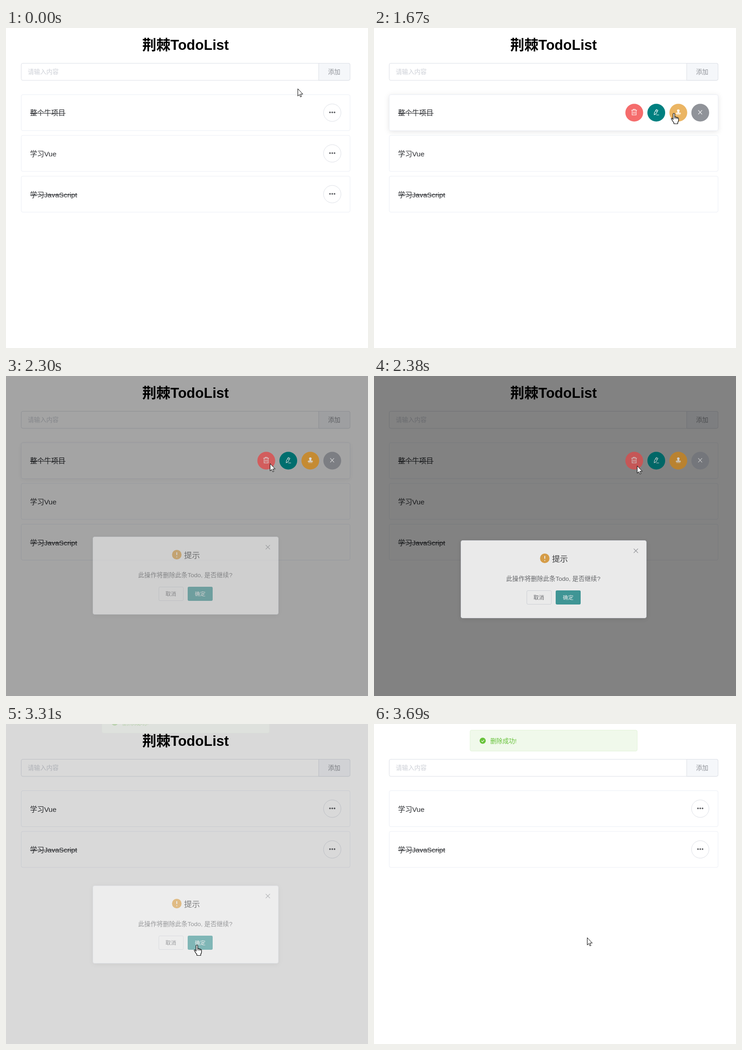
An HTML page that plays this animation: 797 by 703 pixels, repeating every 4500 ms.

```html
<!DOCTYPE html>
<html lang="zh">
<head>
<meta charset="utf-8">
<title>TodoList</title>
<style>
  html, body { margin: 0; width: 100%; height: 100%; overflow: hidden; background: #fff; }
  svg { display: block; width: 797px; height: 703px;
    font-family: "Liberation Sans", "Noto Sans CJK SC", "Noto Sans CJK", sans-serif; }
  h1, .title { font-size: 31px; font-weight: bold; }
  .item { font-size: 15.52px; fill: #2a2c30; }
  .body { font-size: 13.58px; }
  .small { font-size: 11.64px; text-anchor: middle; }
  .card { fill: #fff; stroke: #ebeef5; }
  .strike { stroke: #2a2c30; }
  .shadow { fill: rgba(0, 0, 0, .1); filter: blur(6px); }
  .line { fill: none; stroke: #fff; stroke-width: 1.1; }
  .ring { fill: #fff; stroke: #dcdfe6; }
  .dots { fill: #606266; }
  .pointer { fill: #fff; stroke: #000; stroke-linejoin: round; }
</style>
</head>
<body>
<svg viewBox="0 0 797 703">
  <defs>
    <g id="more">
      <circle class="ring" r="19.2"/>
      <g class="dots"><circle cx="-5" cy="-.6" r="1.8"/><circle cy="-.6" r="1.8"/><circle cx="5" cy="-.6" r="1.8"/></g>
    </g>
    <rect id="card" class="card" x="33.5" y="146.5" width="724" height="79" rx="3.5"/>
  </defs>

  <text class="title" x="300" y="47.5">荆棘TodoList</text>
  <rect x="33.5" y="77.5" width="724" height="37.5" rx="3.5" fill="#fff" stroke="#dcdfe6"/>
  <path d="M688.5 77.5H754q3.5 0 3.5 3.5V111.500q0 3.500-3.500 3.500H688.500Z" fill="#f5f7fa" stroke="#dcdfe6"/>
  <text class="body" x="48" y="101" fill="#cdd0d7">请输入内容</text>
  <text class="body" x="709" y="101" fill="#909399">添加</text>

  <g id="first">
    <rect id="lift" class="shadow" x="33" y="148" width="725" height="80" rx="4"/>
    <use href="#card"/>
    <text class="item" x="53" y="192">整个牛项目</text>
    <path class="strike" d="M53 187.5H131"/>
    <g id="firstMore" transform="translate(718.3 186)">
      <circle id="firstRing" class="ring" r="19.2"/>
      <g id="firstDots" class="dots"><circle cx="-5" cy="-.6" r="1.8"/><circle cy="-.6" r="1.8"/><circle cx="5" cy="-.6" r="1.8"/></g>
    </g>
  </g>

  <g id="rest">
    <use href="#card" y="89.500"/>
    <text class="item" x="53" y="282">学习Vue</text>
    <use href="#card" y="179"/>
    <text class="item" x="53" y="371.500">学习JavaScript</text>
    <path class="strike" d="M53 366.500H157"/>
    <g id="restMore">
      <use href="#more" x="718.300" y="275.500"/>
      <use href="#more" x="718.300" y="365"/>
    </g>
  </g>

  <rect id="modal" width="797" height="703"/>

  <g id="actions">
    <g transform="translate(573 186)">
      <circle class="act" r="19.600"/>
      <path class="line" d="M-6.500-5.500H6M-2.500-5.500V-7.500H2V-5.500M-4.700-5.500V5H4.200V-5.500M-1.800-2.500V2.500M1.300-2.500V2.500"/>
    </g>
    <g transform="translate(621.500 186)">
      <circle class="act" r="19.600"/>
      <path class="line" d="M-4.500 4.500L-4.200 .500L0-7L3.600-5L-.700 2.500ZM-1.500-4.500L2-2.500M0 5H6"/>
    </g>
    <g transform="translate(670 186)">
      <circle class="act" r="19.600"/>
      <path d="M-1.300-1Q-3-3-2.800-4.500A2.800 2.800 0 0 1 2.800-4.500Q3-3 1.300-1V0H4Q5.500 0 5.500 1.500V2.600H-5.500V1.500Q-5.500 0-4 0H-1.300ZM-4.500 3.700H4.500V4.800H-4.500Z" fill="#fff"/>
    </g>
    <g transform="translate(718.300 186)">
      <circle class="act" r="19.600"/>
      <path class="line" d="M-4.500-5.300L4 3.700M4-5.300L-4.500 3.700"/>
    </g>
  </g>

  <g id="dialog">
    <rect class="shadow" x="191" y="366" width="409" height="171" rx="4"/>
    <rect class="card" x="191.500" y="364.500" width="408" height="170" rx="3.500"/>
    <path d="M571.800 382.300L581.200 391.700M581.200 382.300L571.800 391.700" stroke="#909399" stroke-width="1.200"/>
    <circle cx="376" cy="403.500" r="10.500" fill="#e6a23c"/>
    <path d="M376 398.300V404.500M376 407.400V409.200" stroke="#fff" stroke-width="2"/>
    <text x="392" y="411.300" font-size="17.460" fill="#303133">提示</text>
    <text class="body" x="291" y="453" fill="#606266">此操作将删除此条Todo, 是否继续?</text>
    <rect x="336.500" y="474.500" width="54" height="30" rx="2.500" fill="#fff" stroke="#dcdfe6"/>
    <text class="small" x="363" y="493.700" fill="#606266">取消</text>
    <rect id="confirm" x="400" y="474" width="55" height="31" rx="3"/>
    <text class="small" x="427.500" y="493.700" fill="#fff">确定</text>
  </g>

  <g id="toast">
    <rect x="211.500" y="13.500" width="368" height="46" rx="3.500" fill="#f0f9eb" stroke="#e1f3d8"/>
    <circle cx="239.300" cy="36.800" r="6.800" fill="#67c23a"/>
    <path class="line" d="M236.300 36.800L238.700 39.200L242.500 34.800"/>
    <text class="body" x="256" y="41.700" fill="#67c23a">删除成功!</text>
  </g>

  <path id="arrow" class="pointer" d="M.5 .5V16.500L4 13.200L6.300 18.500L8.700 17.500L6.400 12.200H11.500Z"/>
  <g id="hand">
    <path class="pointer" stroke-width="1.200" d="M-1.300 2Q-1.300 .500 .300 .500T2 2V8.500Q4.500 7.200 5 9Q7.300 8 7.800 9.800Q10.500 9.300 10.500 12V16Q10.500 18 8.700 20.500V23.500H.200V21Q-3-17.500 -3-17.500Z" style="display:none"/>
    <path class="pointer" stroke-width="1.200" d="M-1.500 14V2Q-1.500 .500 .200 .500T2 2V8.800Q4.500 7.300 5 9.500Q7.300 8.300 7.800 10.300Q10.500 9.500 10.500 12.300V16Q10.500 18.500 8.700 20.500V23.500H.300V21Q-2.500 18-3.700 15.500L-5.300 13Q-6 11.300-4.500 11Q-3.500 10.700-1.500 14Z"/>
    <path d="M2 9V12.500M5 10V12.800M7.800 10.800V13" stroke="#000"/>
  </g>
</svg>

<script>
const LOOP = 4500;
const $ = id => document.getElementById(id);
const show = (id, on) => { $(id).style.display = on ? '' : 'none'; };
const clamp = v => Math.max(0, Math.min(1, v));

// pointer path: time, x, y
const path = [
  [375, 642, 133], [450, 645, 136], [525, 655, 146], [600, 672, 158],
  [750, 700, 176], [894, 711, 182], [1436, 711, 182], [1514, 703, 183],
  [1669, 660, 187], [1824, 612, 189], [1979, 583, 188], [2212, 583, 188],
  [2367, 579, 197], [2444, 560, 227], [2522, 527, 274], [2677, 460, 400],
  [2754, 436, 450], [2832, 424, 479], [2909, 420, 485], [3374, 420, 485],
  [3452, 430, 480], [3606, 463, 468], [3684, 469, 469]
];
const centers = [573, 621.5, 670, 718.3];
const colors = ['#f56c6c', '#008080', '#e6a23c', '#909399'];
const hovers = ['#f78989', '#339999', '#ebb563', '#a6a9ad'];
const acts = document.querySelectorAll('.act');

// the screen refreshes about 13 times a second
function hold(t) {
  return t < 894 ? Math.floor(t / 75) * 75 : 894 + Math.floor((t - 894) / 77.5) * 77.5;
}

// CSS "ease" = cubic-bezier(.25, .1, .25, 1)
function ease(x) {
  const bez = (s, a, b) => 3 * a * s * (1 - s) ** 2 + 3 * b * s * s * (1 - s) + s ** 3;
  let lo = 0, hi = 1;
  for (let i = 0; i < 20; i++) {
    const mid = (lo + hi) / 2;
    if (bez(mid, .25, .25) < x) lo = mid; else hi = mid;
  }
  return bez(lo, .1, 1);
}
const ramp = (t, start, dur) => {
  const x = clamp((t - start) / dur);
  return x === 0 || x === 1 ? x : ease(x);
};

function pointerAt(t) {
  const i = path.findIndex(p => p[0] > t);
  if (i === 0) return path[0].slice(1);
  if (i < 0) return path[path.length - 1].slice(1);
  const [a, b] = [path[i - 1], path[i]];
  const k = (t - a[0]) / (b[0] - a[0]);
  return [a[1] + (b[1] - a[1]) * k, a[2] + (b[2] - a[2]) * k];
}

function draw(time) {
  const t = hold(time);
  const [x, y] = pointerAt(t);
  const open = t > 1100 && t < 3250;
  const removed = t > 3250;
  const free = t < 2205;
  const over = free ? centers.findIndex(c => Math.hypot(x - c, y - 186) < 19.6) : -1;
  const hot = over >= 0 && (open || over === 3);

  // list
  show('first', !removed);
  show('firstMore', !open);
  show('restMore', !open);
  $('rest').setAttribute('transform', `translate(0 ${removed ? -89.5 : 0})`);
  $('lift').style.opacity = ramp(t, 520, 300) - ramp(t, 2205, 300);
  const pressed = t > 970;
  $('firstRing').style.fill = hot ? '#e6f2f2' : '';
  $('firstRing').style.stroke = hot ? (pressed ? '#007373' : '#b3d9d9') : '';
  $('firstDots').style.fill = hot ? (pressed ? '#007373' : '#008080') : '';

  // modal layer and round buttons
  const dim = ramp(t, 2205, 200) - ramp(t, 3214, 200);
  $('modal').style.opacity = dim / 2;
  show('actions', open);
  $('actions').style.filter = dim > 0 ? `brightness(${1 - .2 * dim})` : 'none';
  acts.forEach((el, i) => { el.style.fill = (i === over && t > 1150 ? hovers : colors)[i]; });
  if (t > 2035 && t < 2250) acts[0].style.fill = '#dd6161';

  // dialog
  const seen = ramp(t, 2205, 300) - ramp(t, 3214, 300);
  show('dialog', seen > 0);
  $('dialog').style.opacity = seen;
  $('dialog').setAttribute('transform', `translate(0 ${Math.round(-20 * (1 - seen))})`);
  $('confirm').style.fill = t > 3120 && t < 3250 ? '#007373' : '#339999';

  // toast
  const slide = ramp(t, 3243, 400);
  $('toast').style.opacity = ramp(t, 3243, 300);
  $('toast').setAttribute('transform', `translate(0 ${-47 * (1 - slide)})`);

  // pointer
  const onConfirm = t > 2500 && t < 3440 && x > 400 && x < 455 && y > 474 && y < 505;
  const grab = hot || onConfirm;
  show('hand', grab);
  show('arrow', !grab);
  $(grab ? 'hand' : 'arrow').setAttribute('transform', `translate(${Math.round(x)} ${Math.round(y)})`);
}

function tick() {
  draw(performance.now() % LOOP);
  requestAnimationFrame(tick);
}
tick();
</script>
</body>
</html>
```
